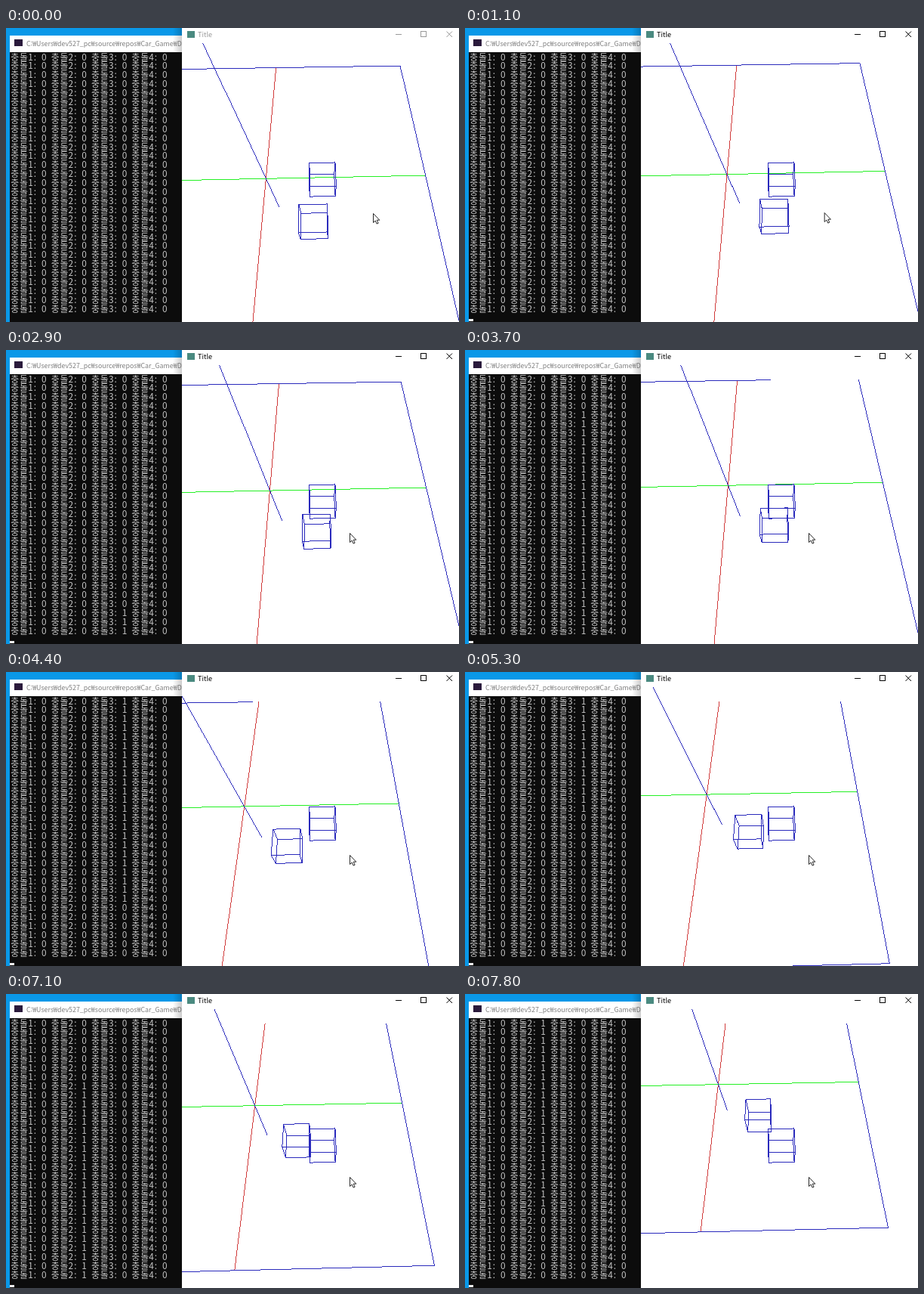
Write an HTML page with a canvas that moves like this. It is 600x389 px and loops after 8000 ms.

```html
<!DOCTYPE html>
<html lang="ko">
<head>
<meta charset="utf-8">
<title>Title</title>
<style>
  html, body { margin: 0; width: 100%; height: 100%; overflow: hidden; background: #fff; }
  canvas { display: block; width: 600px; height: 389px; }
</style>
</head>
<body>
<canvas id="stage" width="600" height="389"></canvas>
<script>
const ctx = document.getElementById('stage').getContext('2d');
const LOOP = 8000, STEP = 100;
const SANS = '"Noto Sans CJK KR", "Noto Sans CJK", "Noto Sans", sans-serif';
const BLUE = '#2a2abc', RED = '#d03a3a', GREEN = '#24f024';

// Camera one unit above the ground, pitched down with a 60 degree field of view.
const VIEW = { x: 233, y: 20, cx: 421, cy: 205, focal: 324.7, far: 1.4833 };
const PITCH = Math.atan2(663, VIEW.focal), SIN = Math.sin(PITCH), COS = Math.cos(PITCH);
const YAW = 0.0224;
const FIELD = 0.734;                       // half the side of the field
const CUBE = { half: 0.0567, low: -0.025, high: 0.081 };
const CAR = { a: -0.0064, b: 0.491 };      // stays put in front of the camera
const ACTIVATE = 300;

// time, then the place of the world origin on screen
const ORIGIN = [
  [0, 344.3, 199.3], [300, 344.3, 199.3], [1900, 349.7, 187.8], [2700, 349.7, 187.8],
  [3700, 348.4, 179.2], [4400, 315.7, 177.9], [5300, 320.2, 162.1], [5700, 320.2, 162.1],
  [6500, 336, 151], [6900, 336, 151], [7100, 329.7, 147.7], [7800, 335.4, 119.7]
];
const POINTER = [[0, 486, 245], [900, 486, 245], [1500, 455, 242]];
// time, then the number of console lines printed
const PRINTED = [
  [2700, 0], [3700, 27], [4400, 35], [5300, 45], [5700, 45],
  [6500, 64], [6900, 64], [7100, 70], [7800, 78]
];
// console lines on which a column reads 1: [first, end)
const HITS = { 2: [49, 71], 3: [3, 30] };

function sample(keys, t) {
  const next = keys.findIndex(k => k[0] > t);
  if (next === 0) return keys[0].slice(1);
  if (next < 0) return keys[keys.length - 1].slice(1);
  const from = keys[next - 1], to = keys[next];
  const k = (t - from[0]) / (to[0] - from[0]);
  return from.slice(1).map((v, i) => v + (to[i + 1] - v) * k);
}

function rect(color, x, y, w, h) {
  ctx.fillStyle = color;
  ctx.fillRect(x, y, w, h);
}

function text(str, x, y, size, color, align = 'left') {
  ctx.font = `${size}px ${SANS}`;
  ctx.textAlign = align;
  ctx.textBaseline = 'alphabetic';
  ctx.fillStyle = color;
  ctx.fillText(str, x, y);
}

function groundAt(x, y) {
  const q = (VIEW.cy - y) / VIEW.focal;
  const b = (COS + q * SIN) / (SIN - q * COS);
  return { a: (x - VIEW.cx) / VIEW.focal * (b * COS + SIN), b };
}

// Shift a ground position along the world axes.
function shift(base, x, y) {
  return {
    a: base.a + x * Math.cos(YAW) - y * Math.sin(YAW),
    b: base.b + x * Math.sin(YAW) + y * Math.cos(YAW)
  };
}

// World point relative to a ground position, in camera axes.
function place(base, x, y, z) {
  const { a, b } = shift(base, x, y);
  return { right: a, up: b * SIN - (1 - z) * COS, depth: b * COS + (1 - z) * SIN };
}

function clipFar(p, q) {
  if (p.depth <= VIEW.far) return p;
  const k = (VIEW.far - q.depth) / (p.depth - q.depth);
  return {
    right: q.right + (p.right - q.right) * k,
    up: q.up + (p.up - q.up) * k,
    depth: VIEW.far
  };
}

function project(p) {
  return [VIEW.cx + VIEW.focal * p.right / p.depth, VIEW.cy - VIEW.focal * p.up / p.depth];
}

// One pixel wide line without smoothing.
function line(color, p, q) {
  if (p.depth > VIEW.far && q.depth > VIEW.far) return;
  const [x0, y0] = project(clipFar(p, q)), [x1, y1] = project(clipFar(q, p));
  const n = Math.max(1, Math.ceil(Math.max(Math.abs(x1 - x0), Math.abs(y1 - y0))));
  ctx.fillStyle = color;
  for (let i = 0; i <= n; i++) {
    ctx.fillRect(Math.floor(x0 + (x1 - x0) * i / n), Math.floor(y0 + (y1 - y0) * i / n), 1, 1);
  }
}

function square(base, half, z) {
  return [[-1, -1], [1, -1], [1, 1], [-1, 1]].map(([x, y]) => place(base, x * half, y * half, z));
}

function outline(points) {
  points.forEach((p, i) => line(BLUE, p, points[(i + 1) % points.length]));
}

function cube(base) {
  const low = square(base, CUBE.half, CUBE.low), high = square(base, CUBE.half, CUBE.high);
  outline(low);
  outline(high);
  low.forEach((p, i) => line(BLUE, p, high[i]));
}

function drawScene(t) {
  const origin = groundAt(...sample(ORIGIN, t));
  const at = (x, y, z) => place(origin, x * FIELD, y * FIELD, z * FIELD);
  ctx.save();
  ctx.beginPath();
  ctx.rect(VIEW.x, VIEW.y, 600 - VIEW.x, 389 - VIEW.y);
  ctx.clip();
  line(GREEN, at(-1, 0, 0), at(1, 0, 0));
  line(RED, at(0, -1, 0), at(0, 1, 0));
  line(BLUE, at(0, 0, -0.5), at(0, 0, 1));
  outline(square(origin, FIELD, 0));
  cube(shift(origin, 0.298 * FIELD, -0.298 * FIELD));
  cube(CAR);
  ctx.restore();
}

function drawConsole(t) {
  const cell = 5.93, rows = 29;
  const printed = Math.round(sample(PRINTED, t)[0]);
  rect('#0c0c0c', 5, 32, 228, 357);
  for (let row = 0; row < rows; row++) {
    const index = printed - rows + 1 + row, y = 42.5 + row * 11.9;
    for (let n = 1; n <= 4; n++) {
      const x = 5.8 + (n - 1) * 9 * cell;
      const [first, end] = HITS[n] || [0, 0];
      const glyph = (str, pos) => text(str, x + pos * cell, y, 11.9, '#c4c4c4', 'center');
      glyph('충', 1);
      glyph('돌', 3);
      glyph(n, 4.5);
      glyph(':', 5.5);
      glyph(index >= first && index < end ? 1 : 0, 7.5);
    }
  }
  if (t >= ACTIVATE) rect('#f2f2f2', 5, 385, 6, 3);

  rect('#fff', 5, 10, 228, 22);
  rect('#2a1a3c', 11, 15, 11, 9);
  ctx.save();
  ctx.beginPath();
  ctx.rect(5, 10, 228, 22);
  ctx.clip();
  text('C:₩Users₩dev527_pc₩source₩repos₩Car_Game₩De', 27, 24, 8.9, '#808080');
  ctx.restore();
  const shade = ctx.createLinearGradient(221, 0, 233, 0);
  shade.addColorStop(0, 'rgba(0,0,0,0)');
  shade.addColorStop(1, 'rgba(0,0,0,.2)');
  rect(shade, 221, 0, 12, 32);
}

function drawTitleBar(active) {
  const ink = active ? '#000' : '#999';
  rect('#4a8a80', 240, 4, 10, 9);
  text('Title', 254, 12, 9.2, ink);
  rect(ink, 516, 8, 8, 1);
  ctx.strokeStyle = ink;
  ctx.lineWidth = 1;
  ctx.strokeRect(549.5, 4.5, 7, 7);
  ctx.beginPath();
  ctx.moveTo(583.5, 4.5);
  ctx.lineTo(591, 12);
  ctx.moveTo(591, 4.5);
  ctx.lineTo(583.5, 12);
  ctx.stroke();
}

function drawPointer(x, y) {
  ctx.save();
  ctx.translate(x + 0.5, y + 0.5);
  const arrow = new Path2D('M0 0V12L2.7 9.5L4.6 13.6L6.6 12.7L4.7 8.7H8.3Z');
  ctx.fillStyle = '#fff';
  ctx.fill(arrow);
  ctx.strokeStyle = '#111';
  ctx.lineWidth = 0.9;
  ctx.stroke(arrow);
  ctx.restore();
}

function draw(now) {
  const t = Math.floor(now % LOOP / STEP) * STEP;
  rect('#0a98e8', 0, 0, 600, 389);
  drawConsole(t);
  rect('#fff', 233, 0, 367, 389);
  drawTitleBar(t >= ACTIVATE);
  drawScene(t);
  drawPointer(...sample(POINTER, t));
}

const start = performance.now();
function tick() {
  draw(performance.now() - start);
  requestAnimationFrame(tick);
}
tick();
</script>
</body>
</html>
```
